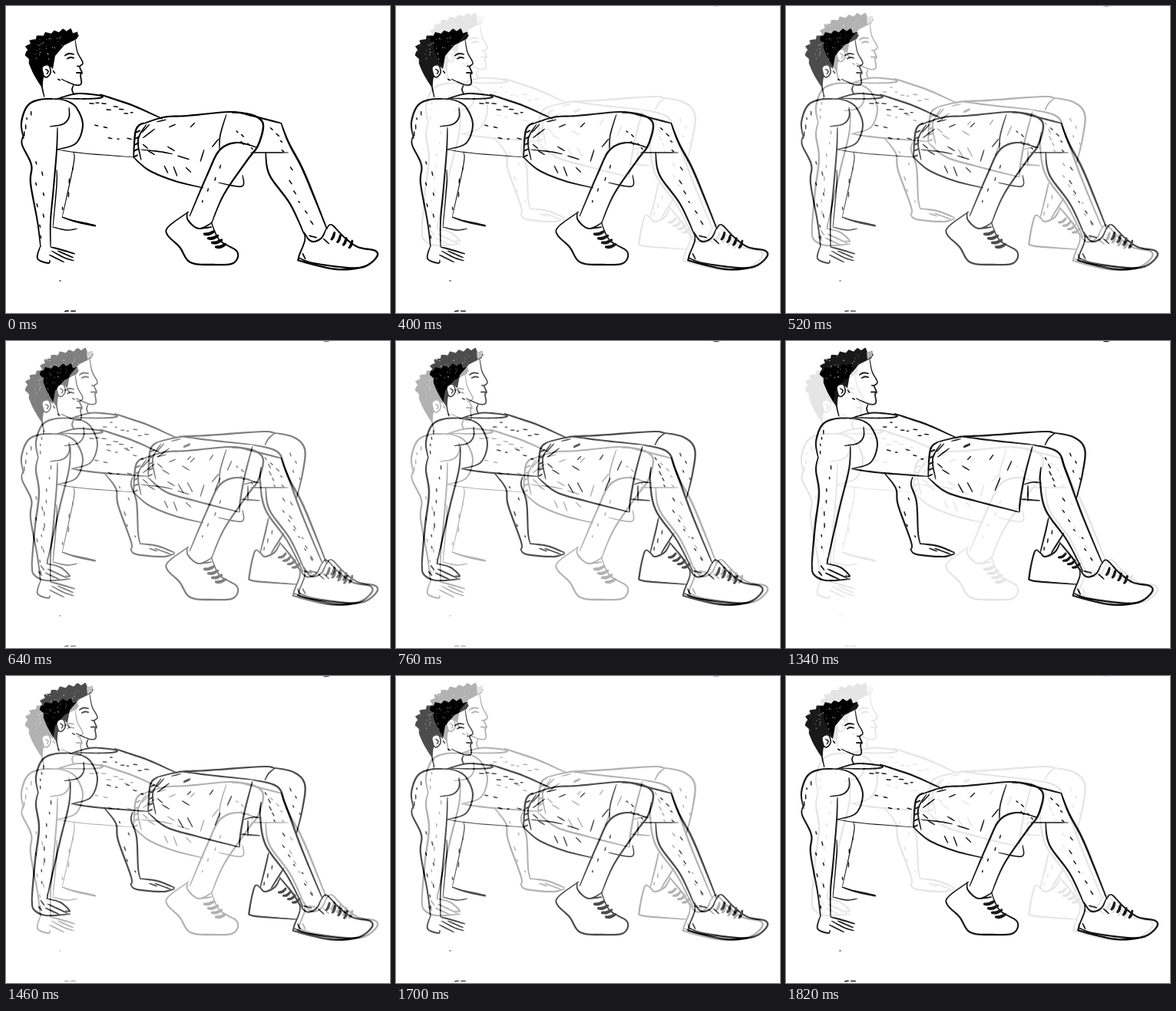
Recreate the animation shown at these times as an HTML page. Size 500 px wide and 400 px high, loop 1880 ms.

```html
<!DOCTYPE html>
<html lang="en">
<head>
<meta charset="utf-8">
<title>Reverse plank exercise</title>
<style>
  html, body { margin: 0; width: 100%; height: 100%; overflow: hidden; background: #fff; }
  svg { position: absolute; left: 0; top: 0; width: 500px; height: 400px; background: #fff; }
  #high { animation: fade 1880ms infinite; }
  /* hold 400 ms, nine 60 ms blend steps, and back again */
  @keyframes fade {
    0% { opacity: 0; animation-timing-function: step-end; }
    21.276% { opacity: .1; animation-timing-function: steps(9, end); }
    50% { opacity: 1; animation-timing-function: step-end; }
    71.276% { opacity: .9; animation-timing-function: steps(9, end); }
    100% { opacity: 0; }
  }
</style>
</head>
<body>
<svg id="low" viewBox="0 0 500 400"></svg>
<svg id="high" viewBox="0 0 500 400"></svg>
<script>
const NS = 'http://www.w3.org/2000/svg';
let seed = 7;
const rnd = () => (seed = seed * 16807 % 2147483647) / 2147483647;
const poly = pts => 'M' + pts.map(p => p.map(v => v.toFixed(2)).join(' ')).join('L') + 'Z';

function parse(text) {
  const n = text.split(' ').map(Number);
  return n.filter((_, i) => i % 2 === 0).map((x, i) => [x, n[2 * i + 1]]);
}

function add(g, pts, fill = '#000') {
  const p = document.createElementNS(NS, 'path');
  p.setAttribute('d', poly(pts));
  p.setAttribute('fill', fill);
  g.append(p);
}

function moved(svg, x, y) {
  const g = document.createElementNS(NS, 'g');
  g.setAttribute('transform', `translate(${x} ${y})`);
  svg.append(g);
  return g;
}

// Catmull-Rom curve through the points
function smooth(pts, n = 8) {
  const out = [], at = i => pts[Math.max(0, Math.min(pts.length - 1, i))];
  for (let i = 0; i < pts.length - 1; i++) {
    const [a, b, c, d] = [at(i - 1), at(i), at(i + 1), at(i + 2)];
    for (let k = 0; k < n; k++) {
      const t = k / n;
      out.push([0, 1].map(j => b[j] + .5 * t * (c[j] - a[j] +
        t * (2 * a[j] - 5 * b[j] + 4 * c[j] - d[j] + t * (3 * (b[j] - c[j]) + d[j] - a[j])))));
    }
  }
  return [...out, at(pts.length - 1)];
}

// Pen line that swells in the middle and thins at its ends
function stroke(g, width, pts) {
  const c = smooth(pts), left = [], right = [], last = c.length - 1;
  c.forEach(([x, y], i) => {
    const p = c[Math.max(0, i - 1)], q = c[Math.min(last, i + 1)];
    const dx = q[0] - p[0], dy = q[1] - p[1], len = Math.hypot(dx, dy) || 1;
    const h = width / 2 * (.45 + .6 * Math.sqrt(Math.max(0, Math.sin(Math.PI * i / last))));
    left.push([x - dy / len * h, y + dx / len * h]);
    right.unshift([x + dy / len * h, y - dx / len * h]);
  });
  add(g, left.concat(right));
}

const ink = (g, width, text) => text.split('|').forEach(t => stroke(g, width, parse(t)));

// Copies of one short line, each shifted by the same step
function repeat(g, width, count, text, dx, dy) {
  for (let i = 0; i < count; i++)
    stroke(g, width, parse(text).map(([x, y]) => [x + i * dx, y + i * dy]));
}

// Small pen flecks strewn around an axis
function flecks(g, count, axis, spread) {
  const [[x1, y1], [x2, y2]] = parse(axis);
  const len = Math.hypot(x2 - x1, y2 - y1), ux = (x2 - x1) / len, uy = (y2 - y1) / len;
  for (let i = 0; i < count; i++) {
    const t = (i + .5) / count * len, off = (rnd() - .5) * 2 * spread, l = 3 + rnd() * 4;
    const x = x1 + ux * t - uy * off, y = y1 + uy * t + ux * off;
    stroke(g, 1.5, [[x, y], [x + ux * l + uy, y + uy * l - ux]]);
  }
}

function hair(g) {
  const outer = smooth(parse('95 38 83 31 66 33 48 37 32 46 26 60 34 85 47 107'), 5);
  const spiky = outer.map(([x, y], i) => {
    const k = i && y < 70 ? 1 + (i % 3 - 1) * .06 : 1;
    return [60 + (x - 60) * k, 65 + (y - 65) * k];
  });
  add(g, spiky.concat(parse('48 95 50 92 47 80 54 76 61 82 64 65 76 51 92 43')));
  for (let i = 0; i < 38; i++) {
    const x = 28 + rnd() * 48, y = 38 + rnd() * 34, r = .3 + rnd() * .5;
    add(g, [[x - r, y], [x, y - r], [x + r, y], [x, y + r]], '#fff');
  }
}

function upperBody(g, belly) {
  hair(g);
  ink(g, 1.6, '48 79 46 86 52 93 58 87 56 78 50 77|51 82 55 85 53 89');
  ink(g, 1.7, '90 44 93 60 100 74 96 79 99 87 97 90 98 101 91 103 78 98 72 95');
  ink(g, 2, '76 65 82 62 89 63|79 69 84 67 89 68|91 87 99 87');
  ink(g, 1.7, '48 94 47 105 50 119|88 103 86 109 89 116');
  ink(g, 1.6, '61 84 64 88|67 95 71 97|92 78 96 79');

  ink(g, 2, '64 122 76 118 95 114 124 117 121 120 98 121 68 120');
  ink(g, 2, '66 121 80 124 92 133 100 155 91 179 66 187');
  ink(g, 2.3, '122 115 140 121 166 130 204 147');
  ink(g, 2.3, '66 121 44 122 28 130 20 152 23 173');
  ink(g, 1.8, '82 132 82 145 74 154 57 157');
  ink(g, belly, '66 187 102 192 167 197');
  flecks(g, 8, '104 127 165 142', 5);
  flecks(g, 5, '108 157 160 180', 8);
  flecks(g, 4, '31 132 26 168', 3);

  ink(g, 2.3, '179 152 169 162 166 198');
  ink(g, 1.8, '183 154 172 174 176 201');
  repeat(g, 1.9, 5, '169 165 175 162', -.8, 8);
  ink(g, 1.5, '177 165 187 154|178 172 194 160|178 180 185 186|184 188 194 194|196 151 209 148|212 158 221 154|210 183 220 189');
}

function runningShoe(g) {
  ink(g, 2.3, '417 291 424 285 440 301 458 314 481 319 482 328 465 340 430 343 386 333 381 328 389 306 388 294');
  ink(g, 2.1, '389 296 394 304 401 307 411 302 417 290|381 328 400 335 445 341 468 340');
  repeat(g, 3.4, 4, '423 305 426 301 428 294', 7.7, 3.6);
  ink(g, 1.7, '394 299 405 302|413 303 421 310|386 322 390 330');
}

function drawLow(s) {
  upperBody(s, 1);
  // near arm
  ink(s, 2.2, '22 170 21 181 33 207 32 231 41 281 45 314');
  ink(s, 1.9, '45 312 41 329 55 335 57 331');
  ink(s, 2, '67 158 66 188 62 236 58 280 58 314|58 314 70 317 90 323');
  ink(s, 1.7, '59 319 76 328 89 332|56 324 76 334|67 319 88 328');
  flecks(s, 8, '42 195 48 305', 7);
  ink(s, .8, '69 358 72 358');
  // far arm
  ink(s, 1.2, '88 191 88 206 73 276');
  ink(s, 1.4, '66 213 66 233 61 289|61 288 79 292 93 290');
  ink(s, 2, '73 275 91 281 117 287|84 279 117 286');
  flecks(s, 4, '74 275 86 205', 3);
  // shorts
  ink(s, 2.1, '174 155 205 145 236 143 290 138 313 140');
  ink(s, 2.1, '166 197 186 214 220 228 257 237');
  ink(s, 1.6, '287 141 279 168 278 187|276 230 307 235 308 220|175 187 202 190 217 193');
  ink(s, 1.5, '240 158 246 152|206 208 211 218|218 209 223 222|234 210 241 217|253 203 258 187|268 184 277 173|223 195 239 200');
  // near leg
  ink(s, 2.4, '294 139 313 140 329 146 335 157 328 182 314 201 284 245 268 282');
  ink(s, 2.3, '326 184 300 178 278 188 262 220 239 274');
  flecks(s, 5, '300 158 320 188', 10);
  flecks(s, 4, '285 200 255 262', 6);
  ink(s, 2.2, '238 268 212 287 210 298 226 314 240 334 270 337 296 335 301 320 278 305 267 281');
  ink(s, 2, '236 268 237 279 251 290 269 282|253 290 268 288');
  repeat(s, 4, 4, '257 297 264 297 272 293', 5, 5.6);
  // far leg
  ink(s, 2.2, '304 139 336 147 359 153');
  ink(s, 2.6, '358 152 368 178 385 210 401 248 418 291');
  ink(s, 2.3, '338 190 343 220 370 258 389 299');
  ink(s, 1.4, '318 191 340 191 368 191');
  flecks(s, 4, '338 156 364 190', 8);
  flecks(s, 6, '362 205 402 285', 6);
  runningShoe(s);
  ink(s, 1.6, '76 398 82 397|84 397.5 91 397.5');
}

function drawHigh(s) {
  upperBody(moved(s, 19, -20.5), 2);
  add(s, parse('105 15 113 13 112 20 106 24'), '#aaa');
  // near arm
  ink(s, 2.4, '42 151 39 168 43 198 38 240 34 285 34 300');
  ink(s, 2.2, '34 292 36 304 52 312 84 310');
  ink(s, 2.2, '84 137 82 167 71 212 60 260 53 291');
  ink(s, 2, '53 290 71 295 83 306 77 306|54 297 80 309|51 302 70 311');
  flecks(s, 9, '64 155 47 290', 8);
  ink(s, 1.7, '45 292 50 299|42 300 47 306');
  // far arm
  ink(s, 2.2, '128 172 143 192 146 214 163 262 162 272');
  ink(s, 2.1, '165 177 163 188 170 210 172 250 175 265');
  ink(s, 2.2, '174 264 197 267 220 276|162 271 170 278 204 281 220 277');
  flecks(s, 5, '150 180 166 262', 5);
  ink(s, 1.7, '193 270 215 278|186 270 197 274');
  // shorts
  ink(s, 2.2, '196 132 226 125 262 123 336 118 350 121');
  ink(s, 2.1, '226 124 264 129 320 135');
  ink(s, 2.3, '185 178 209 197 249 209 304 223');
  ink(s, 2.3, '321 137 311 175 305 208 304 223');
  ink(s, 1.8, '305 206 331 208|315 188 315 209');
  ink(s, 1.5, '231 139 240 135|236 155 241 150|224 186 231 198|236 184 243 197|272 195 279 178|288 169 294 156|265 155 270 148');
  // far leg
  ink(s, 1.8, '350 120 342 127 337 136');
  ink(s, 2.3, '344 119 374 125 389 141 386 173 378 206');
  ink(s, 2, '342 230 338 248 331 276|362 250 345 277');
  flecks(s, 4, '368 140 376 185', 8);
  flecks(s, 3, '346 240 336 274', 3);
  ink(s, 2.2, '332 277 324 274 317 305 320 312 349 315 379 317');
  ink(s, 2.2, '356 262 374 284 382 298|331 275 337 281 350 275 357 263');
  repeat(s, 3.4, 4, '354 282 360 281 365 276', 6, 4.4);
  // near leg
  ink(s, 2.5, '320 135 353 144 364 168 385 225 412 290');
  ink(s, 2.3, '332 164 331 184 338 220 366 260 387 301');
  ink(s, 1.6, '310 187 321 184 333 185');
  flecks(s, 5, '338 146 354 190', 7);
  flecks(s, 7, '352 200 396 290', 6);
  runningShoe(moved(s, -6.5, .5));
  ink(s, 2, '413 -.3 417 .3 421 -.3');
}

drawLow(document.getElementById('low'));
drawHigh(document.getElementById('high'));
</script>
</body>
</html>
```
